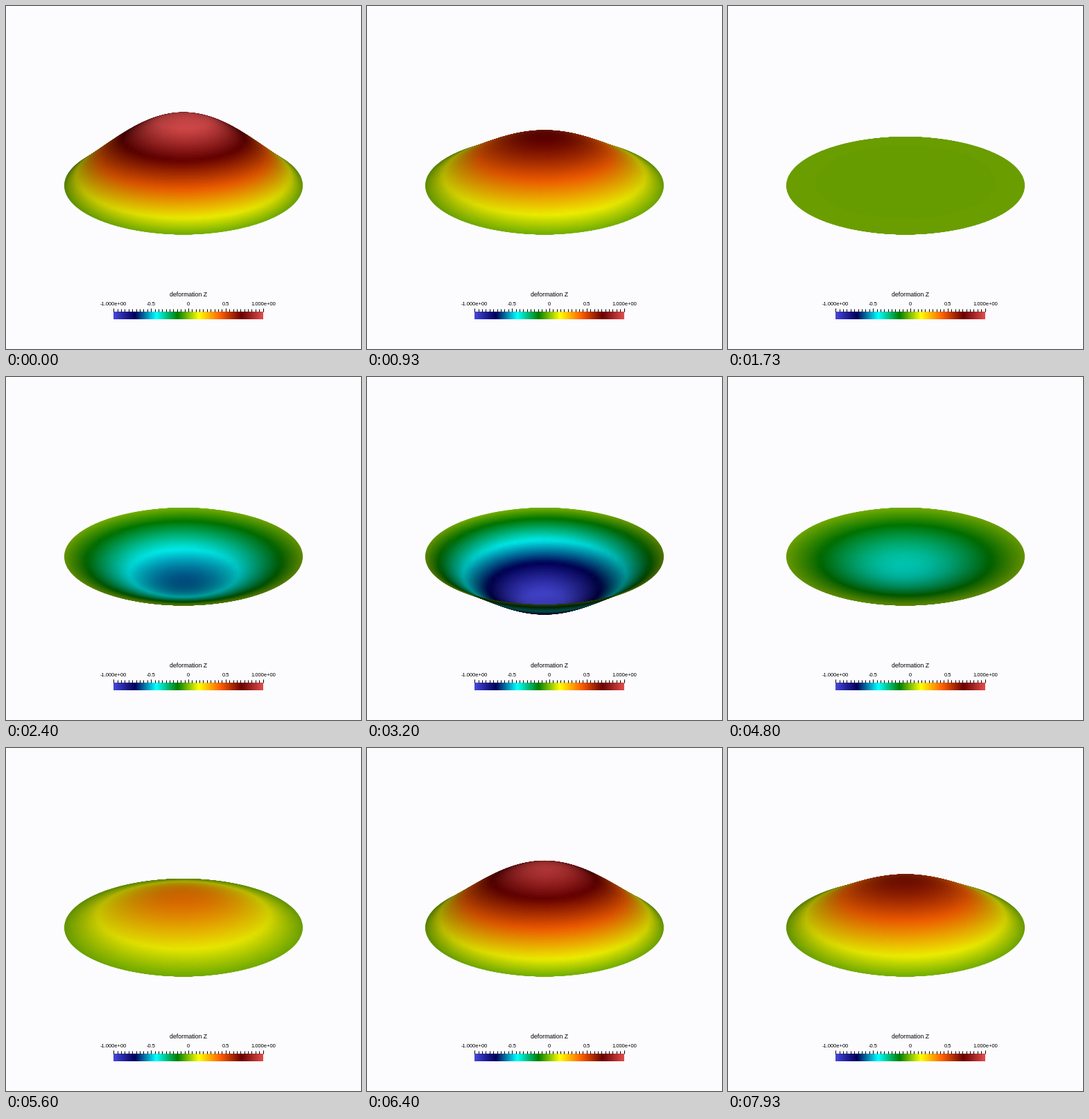
Animation, 512 px wide and 496 px high, one loop 8000 ms. Source, as a matplotlib script:

```python
import math

import numpy as np
import matplotlib.pyplot as plt
from matplotlib.animation import FuncAnimation
from matplotlib.collections import QuadMesh
from matplotlib.colors import LinearSegmentedColormap

W, H, DPI = 512, 496, 100
FRAMES, LOOP_MS = 200, 8000
STEP_MS = LOOP_MS / 120   # the simulation advances at 15 steps per second
PERIOD = 104              # steps per oscillation
LEAD_MS = 14              # keeps steps centred on the drawing interval
ROOT = 2.404826           # first zero of J0
LIFT = 0.547              # height of the membrane at full deflection
GAIN = 1.07               # deflection shown by the colours

# Perspective camera looking at the middle of the disc
SIN = 0.403
COS = math.sqrt(1 - SIN ** 2)
DIST = math.sqrt(2) / math.sin(math.radians(15))
FOCAL = 0.998 * H / 2 / math.tan(math.radians(15))

CMAP = LinearSegmentedColormap.from_list(
    "rainbow_desaturated",
    ["#4747db", "#00005c", "#00ffff", "#008000",
     "#ffff00", "#ff6100", "#6b0000", "#e04d4d"], N=512)


def bessel(order, x):
    """J0 or J1 from the power series."""
    q = -x * x / 4
    total = sum(q ** k / (math.factorial(k) * math.factorial(k + order))
                for k in range(12))
    return total * (x / 2) ** order


def beam(azimuth, elevation):
    """Unit vector towards a light, relative to the camera."""
    a, e = math.radians(azimuth), math.radians(elevation)
    return np.array([math.cos(e) * math.sin(a), math.sin(e),
                     math.cos(e) * math.cos(a)])


KEY, FILL, HEAD = beam(10, 50), beam(-10, -75), beam(0, 0)

# Rows run from the far rim to the near rim, so later rows cover earlier ones
theta = np.linspace(0, np.pi, 101)[:, None]
u = np.linspace(-1, 1, 61)[None, :]
X = np.sin(theta) * u
Y = np.cos(theta) * np.ones_like(u)
R = np.hypot(X, Y)
SHAPE = bessel(0, ROOT * R)
SLOPE = -ROOT * bessel(1, ROOT * R) / np.maximum(R, 1e-9)


def to_camera(x, y, z):
    return np.stack([x, y * SIN + z * COS, z * SIN - y * COS], axis=-1)


def shade(points, amp):
    """Two-sided diffuse light on the surface."""
    steep = -amp * LIFT * SLOPE
    n = to_camera(steep * X, steep * Y, np.ones_like(X))
    n /= np.linalg.norm(n, axis=-1, keepdims=True)
    facing = (n * (DIST * HEAD - points)).sum(-1, keepdims=True)
    n = np.where(facing < 0, -n, n)
    lit = [np.maximum(n @ ray, 0) for ray in (KEY, FILL, HEAD)]
    return 0.75 * lit[0] + 0.25 * (lit[1] + lit[2])


def membrane(amp):
    points = to_camera(X, Y, amp * LIFT * SHAPE)
    scale = FOCAL / (DIST - points[..., 2:])
    coords = [W / 2, H / 2] + points[..., :2] * scale * [1, -1]
    rgba = CMAP((GAIN * amp * SHAPE + 1) / 2)
    rgba[..., :3] *= np.minimum(shade(points, amp), 1)[..., None]
    return QuadMesh(coords, shading="gouraud", antialiased=False,
                    facecolors=rgba.reshape(-1, 4), transform=ax.transData)


def px_size(pixels):
    return pixels * 72 / DPI


def label(x, y, text, size):
    ax.text(x, y, text, fontsize=px_size(size), family="Liberation Sans",
            color="black", ha="center", va="baseline")


def draw_legend():
    left, right, top, bottom = 155, 371, 442, 453
    ax.imshow(np.linspace(0, 1, 432)[None, :], cmap=CMAP, aspect="auto",
              extent=(left, right, bottom, top), interpolation="nearest")
    ticks = np.linspace(left + 0.3, right - 0.4, 41)
    starts = np.where(np.arange(41) % 10 == 0, 437, 438)
    ax.vlines(ticks, starts, top, color="black", lw=px_size(1))
    label(263, 419.5, "deformation Z", 8.8)
    for value in np.linspace(-1, 1, 5):
        text = f"{value:.3e}" if abs(value) == 1 else f"{value:g}"
        label(263 + 108 * value, 433, text, 7.7)


fig = plt.figure(figsize=(W / DPI, H / DPI), dpi=DPI, facecolor="#fcfcfe")
ax = fig.add_axes([0, 0, 1, 1])
draw_legend()
ax.set_xlim(0, W)
ax.set_ylim(H, 0)
ax.axis("off")
surface = []


def update(i):
    while surface:
        surface.pop().remove()
    step = int((i * LOOP_MS / FRAMES + LEAD_MS) / STEP_MS)
    mesh = membrane(math.cos(2 * math.pi * step / PERIOD))
    ax.add_collection(mesh, autolim=False)
    surface.append(mesh)
    return surface


anim = FuncAnimation(fig, update, frames=FRAMES, interval=LOOP_MS / FRAMES,
                     init_func=lambda: update(0), repeat=True, repeat_delay=0)
plt.show()
```
